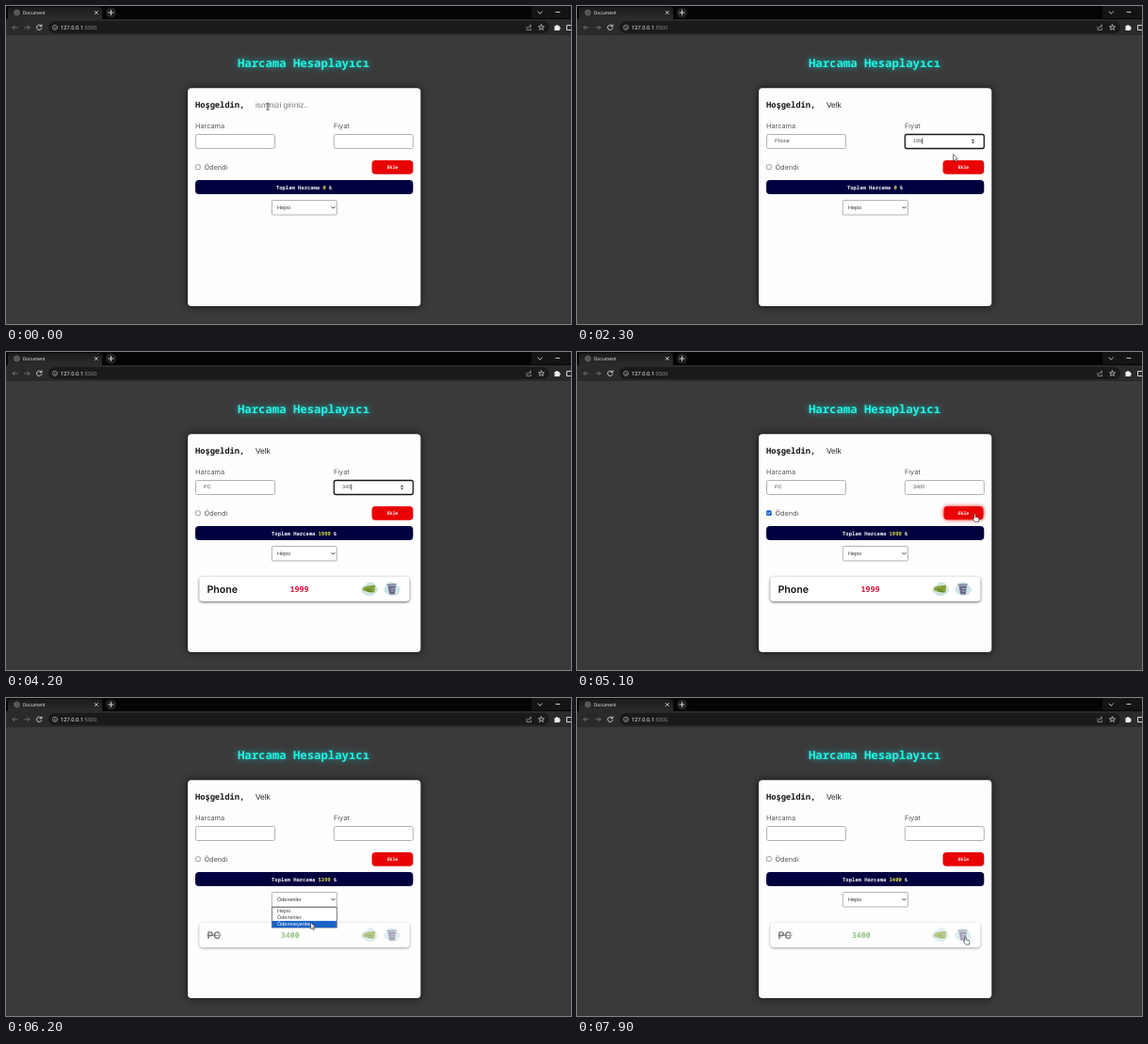
Recreate the animation shown at these times as an HTML page. Size 600x338 px, loop 8 s.

```html
<!DOCTYPE html>
<html lang="tr">
<head>
<meta charset="utf-8">
<title>Harcama Hesaplayıcı</title>
<style>
  html, body { margin: 0; width: 100%; height: 100%; overflow: hidden; background: #3b3a3b; }
  svg { display: block; width: 100vw; height: 100vh; }
  text { font-family: "Liberation Sans", Arial, sans-serif; font-size: 5.5px; fill: #555; text-rendering: geometricPrecision; white-space: pre; }
  .mono { font-family: "Noto Sans Mono", monospace; font-weight: 700; }
  .ui { font-family: Roboto, sans-serif; }
  .label { font-family: Inter, sans-serif; font-size: 7.3px; fill: #555; }
  .item { font-family: Inter, sans-serif; font-size: 10.6px; font-weight: 600; fill: #111; }
  .price { font-size: 8.3px; font-weight: 600; }
  .mid { text-anchor: middle; }
  .title { font-size: 12.3px; fill: #25f3e4; filter: drop-shadow(0 0 3px #10b8b0); }
  .card { fill: #fefefe; filter: drop-shadow(0 0 4px #000a); }
  .box { fill: #fff; stroke: #aaa; stroke-width: .9; }
  .box.focus { stroke: #181818; stroke-width: 1.3; }
  .row > rect { fill: #fff; filter: drop-shadow(0 1px 1.6px #0009); }
  .line { fill: none; stroke-width: .9; stroke-linecap: round; stroke-linejoin: round; }
  .hover { filter: drop-shadow(0 0 2px #f22); }
  .pointer { stroke: #222; stroke-width: .6; fill: #fff; stroke-linejoin: round; }
</style>
</head>
<body>
<svg viewBox="0 0 600 338" preserveAspectRatio="none">
  <defs>
    <linearGradient id="tabFill" x1="0" y1="0" x2="0" y2="1">
      <stop offset="0" stop-color="#1b1b1c"/><stop offset="1" stop-color="#2c2c2e"/>
    </linearGradient>
    <g id="icons">
      <g fill="#cde5e6">
        <ellipse cx="386" cy="252.5" rx="9" ry="5.5"/><ellipse cx="387" cy="249" rx="5" ry="4.5"/><ellipse cx="386" cy="256" rx="6" ry="3.2"/>
        <ellipse cx="410" cy="252.5" rx="8.8" ry="5.5"/><ellipse cx="409" cy="249" rx="5.5" ry="4.5"/><ellipse cx="411" cy="256" rx="6" ry="3.2"/>
      </g>
      <path d="M379 251q3-3 7-2.500l5-.8q2 .2 1 1.500l-.6 6q-4 1.500-7-.5l-5-1z" fill="#87a136"/>
      <path d="M383 252.500h5M384 254.500h5" class="line" stroke="#5d7c2c"/>
      <path d="M405.500 248.500h8.500l-1.200 9h-5.500z" fill="#6b6788"/>
      <path d="M405 247.300l9.500-.3" class="line" stroke="#4c4a70" stroke-width="1.600"/>
      <path d="M409 251.500h4.500M409 254h3" class="line" stroke="#aeb4d4"/>
    </g>
  </defs>

  <rect width="600" height="338" fill="#3b3a3b"/>

  <!-- browser bar -->
  <rect width="600" height="15" fill="#050506"/>
  <path d="M2 14V4q0-3 3-3h94q3 0 3 3v10z" fill="url(#tabFill)"/>
  <rect y="14" width="600" height="17" fill="#2a2a2c"/>
  <rect x="45" y="16" width="532" height="13" rx="6.500" fill="#1a1a1c"/>
  <rect x="558" width="42" height="13" fill="#141415"/>
  <circle cx="11.500" cy="7" r="2.900" fill="#555" stroke="#777" stroke-width=".6"/>
  <text class="ui" x="18" y="8.800" style="font-size:5.1px;fill:#ddd">Document</text>
  <circle cx="111.500" cy="7" r="5.500" fill="#222"/>
  <g class="line" stroke="#ddd">
    <path d="M94.300 5.500l3 3m0-3l-3 3M109 7h5m-2.500-2.500v5"/>
    <path d="M565 6l2.200 2.200L569.400 6M584 6.500h4"/>
    <path d="M37.500 21.200a2.700 2.700 0 1 0 .4 2.400M38 19.800v1.900h-1.900"/>
    <path d="M553 22v3.500h4.500V24M554.500 23.500q.3-2.500 3-2.500m-1-1.300l1.400 1.300l-1.400 1.300" stroke="#aaa" stroke-width=".7"/>
    <path d="M568.500 19.800l.9 2h2.100l-1.700 1.400l.6 2.200l-1.900-1.300l-1.900 1.300l.6-2.200l-1.700-1.400h2.100z" stroke-width=".7"/>
  </g>
  <g class="line" stroke="#777"><path d="M12 22.800H7m2-2l-2 2l2 2M20 22.800h5m-2-2l2 2l-2 2"/></g>
  <g class="line" stroke="#999" stroke-width=".6"><circle cx="52" cy="22.800" r="2.500"/><path d="M52 22.500v1.600"/></g>
  <text class="ui" x="58" y="24.900" style="font-size:5.8px;fill:#eee">127.0.0.1<tspan fill="#888">:5500</tspan></text>
  <path d="M582.500 21h1.500a1.100 1.100 0 0 1 2.200 0h1.600v1.500a1.100 1.100 0 0 1 0 2.200v1.300h-5.300z" fill="#eee"/>
  <path d="M600 20.500h-4.500v5h4.500" class="line" stroke="#eee" stroke-width="1.100"/>

  <text class="mono mid title" x="316" y="64.600">Harcama Hesaplayıcı</text>

  <!-- form -->
  <rect class="card" x="193" y="87.300" width="247.300" height="231.700" rx="4"/>
  <text class="mono" x="201" y="108.300" style="font-size:8.7px;fill:#151515">Hoşgeldin,</text>
  <text id="hint" x="265" y="107.800" style="font-size:8.33px;fill:#777">isminizi giriniz..</text>
  <text id="name" x="265" y="107.800" style="font-size:8.33px;fill:#222"></text>
  <text class="label" x="201" y="130.400">Harcama</text>
  <text class="label" x="348" y="130.400">Fiyat</text>
  <rect id="thingBox" class="box" x="201.500" y="136.500" width="84" height="15" rx="2"/>
  <rect id="costBox" class="box" x="348.300" y="136.500" width="84" height="15" rx="2"/>
  <text id="thing" x="210" y="145.400"></text>
  <text id="cost" x="357" y="145.400"></text>
  <path id="spin" d="M418.800 143.200l1.700-2l1.700 2zM418.800 144.600l1.700 2l1.700-2z" fill="#444"/>
  <rect id="caret" width=".7" fill="#111"/>

  <rect x="201.600" y="168.800" width="4.600" height="4.800" rx=".8" fill="#fff" stroke="#777" stroke-width=".7"/>
  <g id="check">
    <rect x="201.200" y="168.500" width="5.300" height="5.300" rx=".9" fill="#0b60d0"/>
    <path d="M202.400 171.200l1 1l1.900-2.200" class="line" stroke="#fff" stroke-width=".8"/>
  </g>
  <text class="label" x="210.500" y="173.900">Ödendi</text>
  <rect id="add" x="388.500" y="164" width="43.800" height="14.800" rx="4" fill="#e80202"/>
  <text class="mono mid" x="410.400" y="173" style="font-size:4.8px;fill:#fff">Ekle</text>

  <rect x="201" y="185" width="231.300" height="15" rx="4" fill="#00003f"/>
  <text class="mono mid" x="316.700" y="194.600" style="font-size:5.5px;fill:#f4f4f4">Toplam Harcama <tspan id="total" fill="#dfe24a">0</tspan> ₺</text>
  <rect id="pickBox" class="box" x="282.300" y="206.500" width="69" height="15.500" rx="1"/>
  <text id="pick" x="288" y="216.100" style="fill:#333">Hepsi</text>
  <path d="M345.700 213.400l1.700 1.700l1.700-1.700" class="line" stroke="#222"/>

  <!-- list -->
  <g id="phone" class="row">
    <rect x="205.300" y="238.700" width="223.200" height="26.300" rx="4"/>
    <text class="item" x="213.500" y="255.700">Phone</text>
    <text class="mono price" x="301.600" y="254.900" style="fill:#d80f34">1999</text>
    <use href="#icons"/>
  </g>
  <g id="pc" class="row" opacity=".6">
    <rect x="205.300" y="238.700" width="223.200" height="26.300" rx="4"/>
    <text class="item" x="213.500" y="255.700">PC</text>
    <path d="M213.500 252.200h15" stroke="#111" stroke-width=".9"/>
    <text class="mono price" x="291.800" y="254.900" style="fill:#4f9a2b">3400</text>
    <use href="#icons"/>
  </g>

  <g id="menu">
    <rect x="282.300" y="222.300" width="69" height="21.700" fill="#fff" stroke="#555" stroke-width=".8"/>
    <rect id="mark" x="282.700" width="68.200" height="7.100" fill="#1b62c6"/>
    <text x="288" y="228">Hepsi</text>
    <text x="288" y="235.100">Ödenenler</text>
    <text x="288" y="242.200">Ödenmeyenler</text>
  </g>

  <g id="pointer">
    <path id="arrow" class="pointer" d="M0 0v7.200l1.700-1.500l1.200 2.500l1.100-.5l-1.200-2.400h2.100z"/>
    <path id="beam" class="line" d="M-1.200-3.200h2.400M0-3.200v6.400M-1.200 3.200h2.400" stroke="#555" stroke-width=".7"/>
    <path id="hand" class="pointer" d="M-.8 .5q.8-1 1.500 0v3l3 .6q1 .3.8 1.500l-.6 3h-3.700l-2.300-3.300q0-1 1.300-.3z"/>
  </g>
</svg>
<script>
const LOOP = 8000, STEP = 100;
const $ = id => document.getElementById(id);

// Value of the last step at or before t
const at = (steps, t) => steps.reduce((v, s) => s[0] <= t ? s[1] : v, null);
const within = (t, ...spans) => spans.some(([a, b]) => t >= a && t < b);
const show = (id, on) => $(id).style.display = on ? '' : 'none';

const texts = {
  name: [[0, ''], [400, 'V'], [600, 'Ve'], [700, 'Vel'], [800, 'Velk']],
  thing: [[0, ''], [1300, 'P'], [1400, 'Pho'], [1500, 'Phon'], [1600, 'Phone'],
          [2700, ''], [3300, 'P'], [3400, 'PC'], [5300, '']],
  cost: [[0, ''], [2000, '1'], [2100, '19'], [2200, '199'], [2400, '1999'], [2700, ''],
         [4000, '3'], [4100, '34'], [4200, '340'], [4300, '3400'], [5300, '']],
  total: [[0, '0'], [2700, '1999'], [5300, '5399'], [7800, '3400']],
  pick: [[0, 'Hepsi'], [6000, 'Ödenenler'], [6400, 'Ödenmeyenler'], [6700, 'Hepsi']]
};
const focus = [[0, ''], [400, 'name'], [1200, 'thing'], [1900, 'cost'], [2600, ''],
               [3200, 'thing'], [3900, 'cost'], [4700, ''], [6700, 'pick'], [7800, '']];
const option = [[0, 0], [5900, 1], [6200, 2], [6600, 0]];
const pcShift = [[0, 38.5], [6000, 0], [6700, 38.5], [7800, 0]];
const path = [
  [0, 278, 107], [800, 278, 107], [1200, 240, 143], [1600, 240, 143], [1900, 390, 144],
  [2200, 393, 148], [2300, 399.5, 157.5], [2500, 410, 171], [2700, 410, 171],
  [3200, 238.5, 143], [3600, 238.5, 143], [3900, 388, 144], [4300, 388, 144],
  [4700, 204, 170], [4800, 204, 170], [5100, 422.5, 172], [5300, 422.5, 172],
  [5600, 338, 214], [5700, 338, 214], [5900, 316, 232], [6000, 316, 232],
  [6100, 330, 215], [6200, 323.5, 238.5], [6400, 323.5, 238.5], [6500, 332, 215],
  [6600, 318, 226], [6700, 318, 226], [7000, 362, 243], [7500, 411, 252], [7800, 412.5, 253.5]
];
const shape = [[0, 'beam'], [1700, 'arrow'], [1800, 'beam'], [2200, 'arrow'], [2500, 'hand'],
               [2800, 'arrow'], [3100, 'beam'], [3700, 'arrow'], [3800, 'beam'],
               [4400, 'arrow'], [5000, 'hand'], [5400, 'arrow'], [7400, 'hand']];

function place(t) {
  const i = path.findIndex(p => p[0] > t);
  if (i < 0) return path.at(-1).slice(1);
  const [t0, x0, y0] = path[i - 1], [t1, x1, y1] = path[i];
  const k = (t - t0) / (t1 - t0), e = k * k * (3 - 2 * k);
  return [x0 + (x1 - x0) * e, y0 + (y1 - y0) * e];
}

function drawCaret(id) {
  const typing = id && id !== 'pick';
  show('caret', typing);
  if (!typing) return;
  const el = $(id), big = id === 'name', c = $('caret');
  c.setAttribute('x', +el.getAttribute('x') + el.getComputedTextLength() + .3);
  c.setAttribute('y', big ? 100.5 : 140.5);
  c.setAttribute('height', big ? 9 : 6.3);
}

function draw(t) {
  for (const id in texts) $(id).textContent = at(texts[id], t);
  const active = at(focus, t);
  for (const id of ['thing', 'cost', 'pick']) $(id + 'Box').classList.toggle('focus', active === id);
  drawCaret(active);
  show('hint', t < 400);
  show('spin', active === 'cost');
  show('check', within(t, [4700, 5300]));

  const over = within(t, [2500, 2800], [5000, 5400]), add = $('add');
  add.classList.toggle('hover', over);
  add.setAttribute('x', over ? 389.5 : 388.5);
  add.setAttribute('width', over ? 42 : 43.8);
  add.setAttribute('height', over ? 14.2 : 14.8);

  show('phone', within(t, [2700, 6000], [6400, 7800]));
  show('pc', within(t, [5300, 6400], [6700, LOOP]));
  $('pc').setAttribute('transform', `translate(0 ${at(pcShift, t)})`);

  show('menu', within(t, [5700, 6000], [6100, 6400], [6500, 6700]));
  const chosen = at(option, t);
  $('mark').setAttribute('y', 222.7 + chosen * 7.1);
  document.querySelectorAll('#menu text').forEach((el, i) => el.style.fill = i === chosen ? '#fff' : '#444');

  const kind = at(shape, t);
  for (const id of ['arrow', 'beam', 'hand']) show(id, id === kind);
  show('pointer', !within(t, [400, 800], [1300, 1600], [4000, 4300]));
  $('pointer').setAttribute('transform', `translate(${place(t).join(' ')})`);
}

const start = performance.now();
function tick(now) {
  const t = Math.max(0, now - start) % LOOP;
  draw(Math.floor(t / STEP) * STEP);
  requestAnimationFrame(tick);
}
draw(0);
requestAnimationFrame(tick);
</script>
</body>
</html>
```
